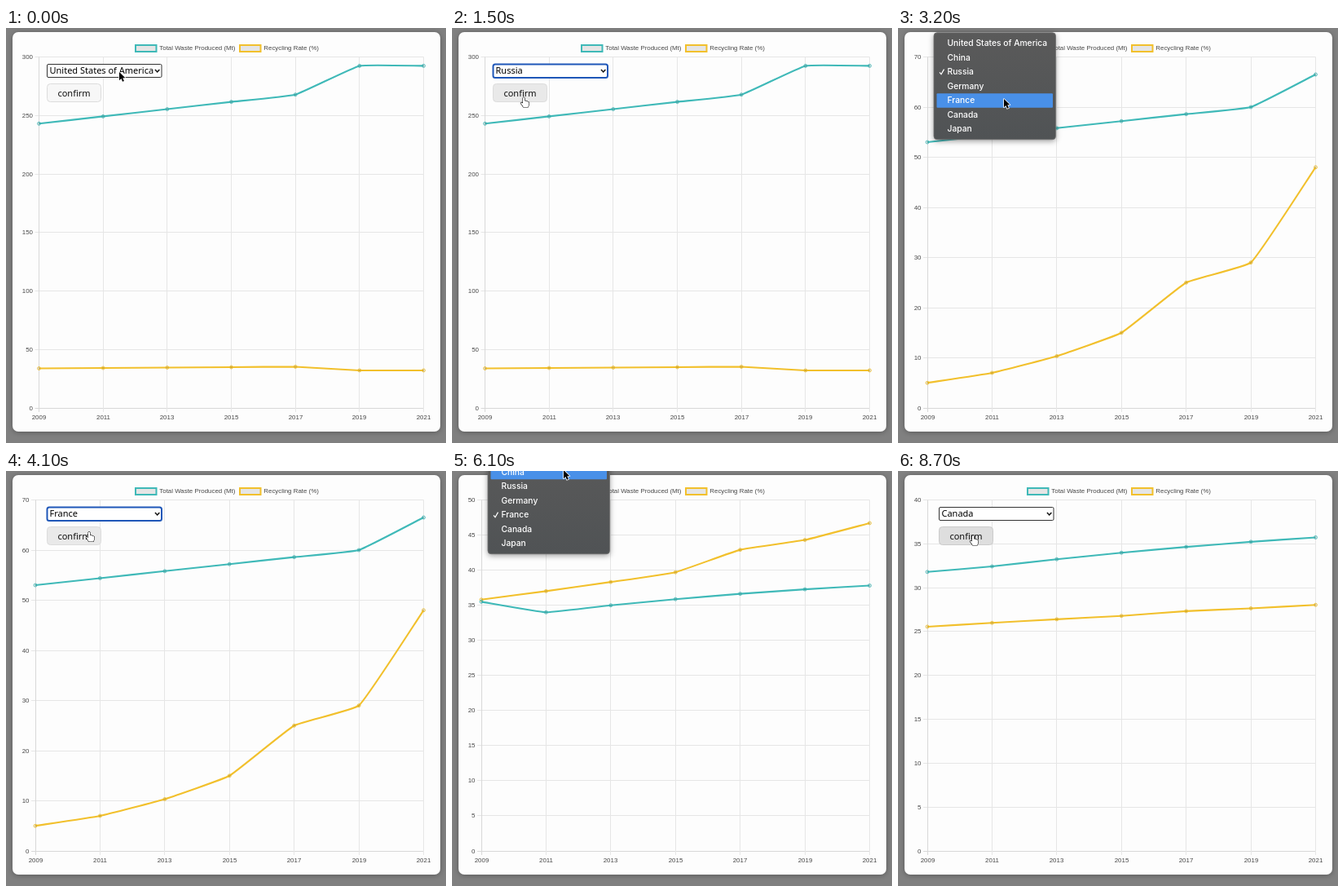
Recreate the animation shown at these times as an HTML page with a canvas. Size 540 by 509 pixels, loop 8800 ms.

```html
<!DOCTYPE html>
<html lang="en">
<head>
<meta charset="utf-8">
<title>Waste chart</title>
<style>
html, body { margin: 0; width: 100%; height: 100%; overflow: hidden; background: #808080; }
canvas { display: block; }
</style>
</head>
<body>
<canvas id="stage" width="540" height="509"></canvas>
<script>
const ctx = document.getElementById('stage').getContext('2d');
const LOOP = 8800, STEP = 100;
const TOP = 35.5, BOTTOM = 466, RIGHT = 512.5;
const TEAL = '#3fb9b8', YELLOW = '#f2c02c';
const SELECT = [139, 54];
const COUNTRIES = ['United States of America', 'China', 'Russia', 'Germany', 'France', 'Canada', 'Japan'];

// n values from a to b, lifted by bulge in the middle
const run = (a, b, bulge, n) => Array.from({ length: n }, (_, i) => {
  const u = i / (n - 1);
  return a + (b - a) * u + 4 * bulge * u * (1 - u);
});

const CHARTS = [
  { max: 300, tick: 50, left: 40.5,
    waste: [...run(243, 267.8, 0, 5), 292.4, 292.4],
    rate: [...run(33.8, 35.2, 0, 5), 32.1, 32.1] },
  { max: 70, tick: 10, left: 36,
    waste: [...run(53, 60, 0, 6), 66.5],
    rate: [...run(5, 15, -1.5, 4), 25, 29, 48] },
  { max: 50, tick: 5, left: 36,
    waste: [35.5, ...run(34, 37.8, 0.36, 6)],
    rate: [...run(35.8, 39.7, -0.1, 4), ...run(42.9, 46.7, -0.5, 3)] },
  { max: 40, tick: 5, left: 36,
    waste: run(32.3, 36.55, 0.35, 7),
    rate: run(25.1, 26.65, 0.17, 7) }
];

// each visit: open the menu, pick a country, press confirm for the next chart
const VISITS = [
  { open: 200, close: 1000, click: 1850, from: 0, to: 2, pick: [128, 88], press: [88, 85] },
  { open: 2900, close: 3700, click: 4225, from: 2, to: 4, pick: [130, 87], press: [102, 74.5] },
  { open: 5200, close: 7600, click: 8300, from: 4, to: 5, pick: [99, 83], press: [92, 79], via: [6100, 137, -1] }
];

// time, x, y of the pointer tip
const PATH = [[0, ...SELECT], ...VISITS.flatMap(v => [
  [v.open, ...SELECT],
  ...(v.via ? [v.via] : []),
  [v.close - 500, ...v.pick],
  [v.close, ...v.pick],
  [v.click - 350, ...v.press],
  [v.click + 575, ...v.press]
])];

function pointer(t) {
  const i = PATH.findIndex(p => p[0] > t);
  const [a, b] = [PATH[i - 1], PATH[i]];
  const u = (t - a[0]) / (b[0] - a[0]), k = u * u * (3 - 2 * u);
  return { x: a[1] + (b[1] - a[1]) * k, y: a[2] + (b[2] - a[2]) * k };
}

function text(str, x, y, font, color, align = 'left') {
  ctx.font = font;
  ctx.fillStyle = color;
  ctx.textAlign = align;
  ctx.textBaseline = 'middle';
  ctx.fillText(str, x, y);
}

function box(x, y, w, h, r, fill, stroke, width = 1) {
  ctx.beginPath();
  ctx.roundRect(x, y, w, h, r);
  if (fill) { ctx.fillStyle = fill; ctx.fill(); }
  if (stroke) { ctx.strokeStyle = stroke; ctx.lineWidth = width; ctx.stroke(); }
}

function shadowed(blur, color, dy, draw) {
  ctx.save();
  ctx.shadowBlur = blur;
  ctx.shadowColor = color;
  ctx.shadowOffsetY = dy;
  draw();
  ctx.restore();
}

function polyline(color, width, ...pts) {
  ctx.strokeStyle = color;
  ctx.lineWidth = width;
  ctx.beginPath();
  pts.forEach(p => ctx.lineTo(...p));
  ctx.stroke();
}

const colX = (c, i) => c.left + (RIGHT - c.left) * i / 6;
const rowY = (c, v) => BOTTOM - v / c.max * (BOTTOM - TOP);
const points = (c, key) => c[key].map((v, i) => ({ x: colX(c, i), y: rowY(c, v) }));

function grid(c) {
  const font = '7.9px "Liberation Sans", Arial, sans-serif', ink = '#484848';
  const snap = v => Math.floor(v) + 0.5;
  const shade = i => i ? '#e6e6e6' : '#d8d8d8';
  for (let v = 0; v <= c.max; v += c.tick) {
    const y = snap(rowY(c, v));
    polyline(shade(v), 1, [c.left - 5, y], [RIGHT, y]);
    text(v, c.left - 7.5, y, font, ink, 'right');
  }
  for (let i = 0; i < 7; i++) {
    const x = snap(colX(c, i));
    polyline(shade(i), 1, [x, TOP], [x, BOTTOM + 5]);
    text(2009 + i * 2, x, 478, font, ink, 'center');
  }
  const legend = (x, color, label) => {
    box(x, 21, 25.5, 8, 0, '#e5e5e5', color, 2);
    text(label, x + 29.3, 25, font, ink);
  };
  legend(159, TEAL, 'Total Waste Produced (Mt)');
  legend(287, YELLOW, 'Recycling Rate (%)');
}

// cubic line with a tension of 0.1
function curve(pts, color) {
  const dist = (a, b) => Math.hypot(a.x - b.x, a.y - b.y);
  const handles = pts.map((p, i) => {
    const a = pts[i - 1] || p, b = pts[i + 1] || p;
    const before = dist(a, p), after = dist(p, b), k = 0.1 / (before + after);
    const dx = (b.x - a.x) * k, dy = (b.y - a.y) * k;
    return { inX: p.x - dx * before, inY: p.y - dy * before, outX: p.x + dx * after, outY: p.y + dy * after };
  });
  ctx.strokeStyle = color;
  ctx.lineWidth = 2.1;
  ctx.beginPath();
  ctx.moveTo(pts[0].x, pts[0].y);
  for (let i = 1; i < pts.length; i++) {
    const a = handles[i - 1], b = handles[i];
    ctx.bezierCurveTo(a.outX, a.outY, b.inX, b.inY, pts[i].x, pts[i].y);
  }
  ctx.stroke();
  ctx.lineWidth = 0.8;
  ctx.fillStyle = 'rgba(0,0,0,.1)';
  for (const p of pts) {
    ctx.beginPath();
    ctx.arc(p.x, p.y, 2, 0, 7);
    ctx.fill();
    ctx.stroke();
  }
}

// after a click the lines glide from the previous chart in one second
function chart(t) {
  const n = VISITS.filter(v => v.click <= t).length;
  const now = CHARTS[n], old = CHARTS[n - 1] || now;
  const left = n ? (1 - Math.min(1, (t - VISITS[n - 1].click) / 1000)) ** 4 : 0;
  grid(now);
  for (const [key, color] of [['rate', YELLOW], ['waste', TEAL]]) {
    const was = points(old, key);
    curve(points(now, key).map((p, i) => ({
      x: p.x + (was[i].x - p.x) * left,
      y: p.y + (was[i].y - p.y) * left
    })), color);
  }
}

function controls(t, hover) {
  const font = '11px "Noto Sans", "Open Sans", sans-serif';
  const last = VISITS.findLast(v => t >= v.close);
  const held = last && t >= last.click;
  if (last && !held) box(50.5, 44.5, 140.5, 16.5, 2.5, '#fff', '#1f57b8', 2);
  else box(50.5, 44.5, 140.5, 16, 1.5, '#fff', '#333');
  text(COUNTRIES[last ? last.to : 0], 53.5, 53, font, '#000');
  polyline('#111', 1.5, [183, 51], [185.7, 54], [188.4, 51]);
  box(50.5, 68.5, 66, 22, 4, held ? '#dedede' : hover ? '#e9e9e9' : '#f7f7f7', held ? '#cbcbcb' : '#dcdcdc');
  text('confirm', 83.5, 80.4, font, '#111', 'center');
}

function menu(selected, y) {
  const rowMid = i => 53.9 + (i - selected) * 17.5;
  const top = rowMid(0) - 13.2, height = 131;
  const shade = ctx.createLinearGradient(0, top, 0, top + height);
  shade.addColorStop(0, '#5a5a5a');
  shade.addColorStop(1, '#505355');
  shadowed(7, 'rgba(0,0,0,.4)', 2, () => box(44, top, 149.5, height, 4, shade));
  box(44, top, 149.5, height, 4, null, '#6f6f6f', 0.8);
  COUNTRIES.forEach((name, i) => {
    const mid = rowMid(i);
    if (Math.abs(y - 4 - mid) <= 8.75) box(47.5, mid - 8.75, 142.5, 17.5, 1, '#4990e8');
    text(name, 60.5, mid, '500 10.3px Inter, "Liberation Sans", sans-serif', '#fff');
    if (i === selected) polyline('#fff', 1.2, [51, mid + 0.5], [53, mid + 2.8], [56.5, mid - 3.3]);
  });
}

const ARROW = new Path2D('M0 0V10.2L2.4 8 4 11.8 5.9 11 4.3 7.3H7.4Z');
const HAND = new Path2D('M-1 1Q0 -.8 1.1 1V4.6Q2.2 3.8 3 5 4 4.3 4.8 5.5 6.5 5.2 6.4 7.2 6.4 9.4 5.2 12H-.4Q-1.4 10 -3.4 7.6C-4.2 6.4 -2.6 5.8 -1 7.4Z');

function cursor(p, hand) {
  const path = hand ? HAND : ARROW;
  ctx.save();
  ctx.translate(p.x, p.y);
  ctx.lineJoin = 'round';
  ctx.lineWidth = hand ? 1.1 : 1.6;
  ctx.strokeStyle = hand ? '#111' : '#fff';
  ctx.fillStyle = hand ? '#fff' : '#000';
  ctx.stroke(path);
  ctx.fill(path);
  ctx.restore();
}

function draw(now) {
  const t = Math.floor(now % LOOP / STEP) * STEP;
  const p = pointer(t);
  const open = VISITS.find(v => t >= v.open && t < v.close);
  const hover = !open && p.x > 50 && p.x < 117 && p.y > 68 && p.y < 91;
  ctx.fillStyle = '#808080';
  ctx.fillRect(0, 0, 540, 509);
  shadowed(6, 'rgba(0,0,0,.3)', 1, () => box(8, 5, 525, 490, 7, '#fdfdfd'));
  chart(t);
  controls(t, hover);
  if (open) menu(open.from, p.y);
  cursor(p, hover);
}

const start = performance.now();
function tick() {
  draw(performance.now() - start);
  requestAnimationFrame(tick);
}
tick();
</script>
</body>
</html>
```
